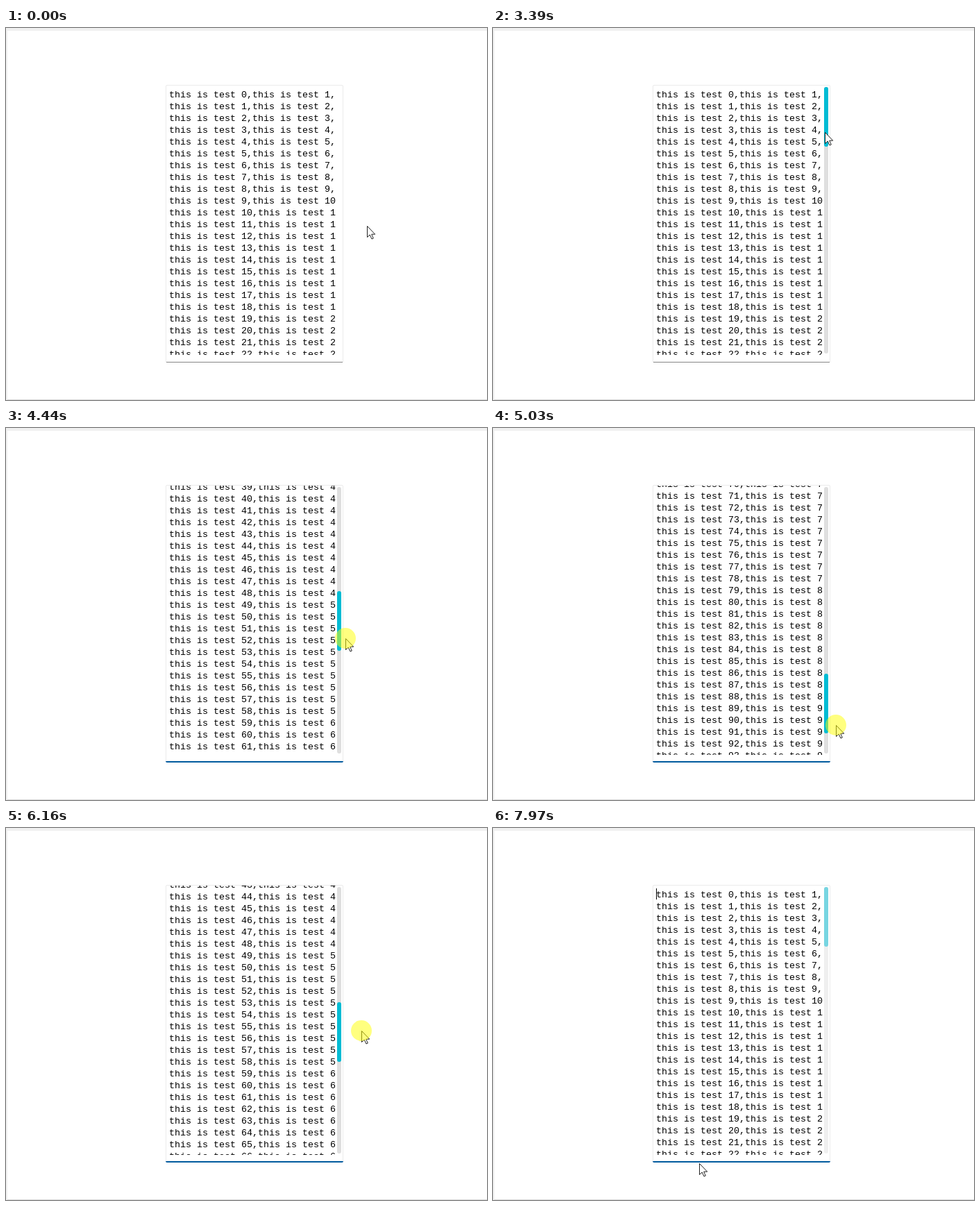
Write an HTML page that moves like this. It is 693 px wide and 536 px high and loops after 8 s.

```html
<!DOCTYPE html>
<html lang="en">
<head>
<meta charset="utf-8">
<title>Text area with scroll bar</title>
<style>
  html, body { margin: 0; width: 100%; height: 100%; overflow: hidden; background: #fff; }
  #stage { position: relative; width: 693px; height: 536px; overflow: hidden; box-sizing: border-box;
    border: solid #f0f0f0; border-width: 4px 0 0 2px; }
  #layer { position: absolute; left: -2px; top: -4px; width: 693px; height: 536px; }
  #layer * { position: absolute; }
  #floor { left: 0; top: 535px; width: 693px; height: 1px; background: #dcdcdc; }
  #field { left: 230px; top: 82px; width: 256px; height: 400px; box-sizing: border-box;
    border: 1px solid #ebebeb; border-radius: 2px; }
  #line { left: 231px; top: 481px; width: 254px; height: 1px; background: #868686; }
  #line.focus { left: 230px; top: 480px; width: 256px; height: 2px; background: #005a9e;
    border-radius: 0 0 2px 2px; }
  #view { left: 231px; top: 83px; width: 246px; height: 388px; overflow: hidden; }
  #text { left: 4px; top: 5px; margin: 0; color: #000;
    font: 13.333px/17px "Liberation Mono", monospace; }
  #caret { left: 235px; top: 87px; width: 1px; height: 16px; background: #000; }
  #track, #handle { left: 477px; top: 85px; width: 6px; border-radius: 3px; }
  #track { height: 384px; background: #dfdfdf; }
  #handle { height: 86px; background: #00bcd4; }
  #halo { left: -15px; top: -15px; width: 30px; height: 30px; border-radius: 50%; background: rgba(255,255,0,.5); }
  #pointer { left: 0; top: 0; }
  #pointer svg { left: 0; top: 0; overflow: visible; }
</style>
</head>
<body>
<div id="stage"><div id="layer">
  <div id="floor"></div>
  <div id="field"></div>
  <div id="line"></div>
  <div id="view"><pre id="text"></pre></div>
  <div id="caret"></div>
  <div id="track"></div>
  <div id="handle"></div>
  <div id="pointer">
    <svg width="13" height="20"><path d="M.5 .5V16.5L4.2 13L7 19L9.3 18L6.7 12.2H11.7Z" fill="#fff" stroke="#222"/></svg>
    <div id="halo"></div>
  </div>
</div></div>
<script>
const LOOP = 8000, PRESS = 3600, RELEASE = 7100, CARET_ON = 7300;
const MAX_SCROLL = 1337, HANDLE_TRAVEL = 298, GRAB_Y = 150, DRAG_LAG = 45;

// Stops of the pointer: time, x, y.
const path = [
  [20, 520, 285], [730, 456, 188], [3000, 478, GRAB_Y], [PRESS, 478, GRAB_Y],
  [4000, 481, 276], [4440, 489, 303], [5030, 494, 428], [5840, 497, 465],
  [6450, 525, 136], [RELEASE, 517, 90], [7500, 485, 140], [7930, 297, 483]
];

const clamp = (value, max = 1) => Math.min(max, Math.max(0, value));
const fade = (time, start) => clamp((time - start) / 200);

function pointerAt(time) {
  const i = clamp(path.findLastIndex(stop => stop[0] <= time), path.length - 2);
  const [t0, x0, y0] = path[i], [t1, x1, y1] = path[i + 1];
  const p = clamp((time - t0) / (t1 - t0));
  return [x0 + (x1 - x0) * p, y0 + (y1 - y0) * p];
}

// The handle follows the pointer a little late while it is dragged.
function dragAt(time) {
  const dragging = time >= PRESS && time < RELEASE;
  return dragging ? clamp((pointerAt(time - DRAG_LAG)[1] - GRAB_Y) / HANDLE_TRAVEL) : 0;
}

const [line, text, caret, track, handle, halo, pointer] =
  ["line", "text", "caret", "track", "handle", "halo", "pointer"]
    .map(id => document.getElementById(id));

text.textContent = Array.from({ length: 100 }, (_, i) =>
  `this is test ${i},this is test ${i + 1},`.slice(0, 30)).join("\n");

const move = (element, x, y) => {
  element.style.transform = `translate(${Math.round(x)}px, ${Math.round(y)}px)`;
};

function draw(now) {
  const time = now % LOOP;
  const drag = dragAt(time);
  move(pointer, ...pointerAt(time));
  move(text, 0, -drag * MAX_SCROLL);
  move(handle, 0, drag * HANDLE_TRAVEL);
  handle.style.opacity = (fade(time, 450) + fade(time, 2700) - fade(time, RELEASE)) / 2;
  track.style.opacity = fade(time, 1150) - fade(time, 7770) / 2;
  halo.hidden = time < PRESS || time >= RELEASE;
  caret.hidden = time < CARET_ON;
  line.className = time >= PRESS ? "focus" : "";
  requestAnimationFrame(draw);
}
draw(performance.now());
</script>
</body>
</html>
```
